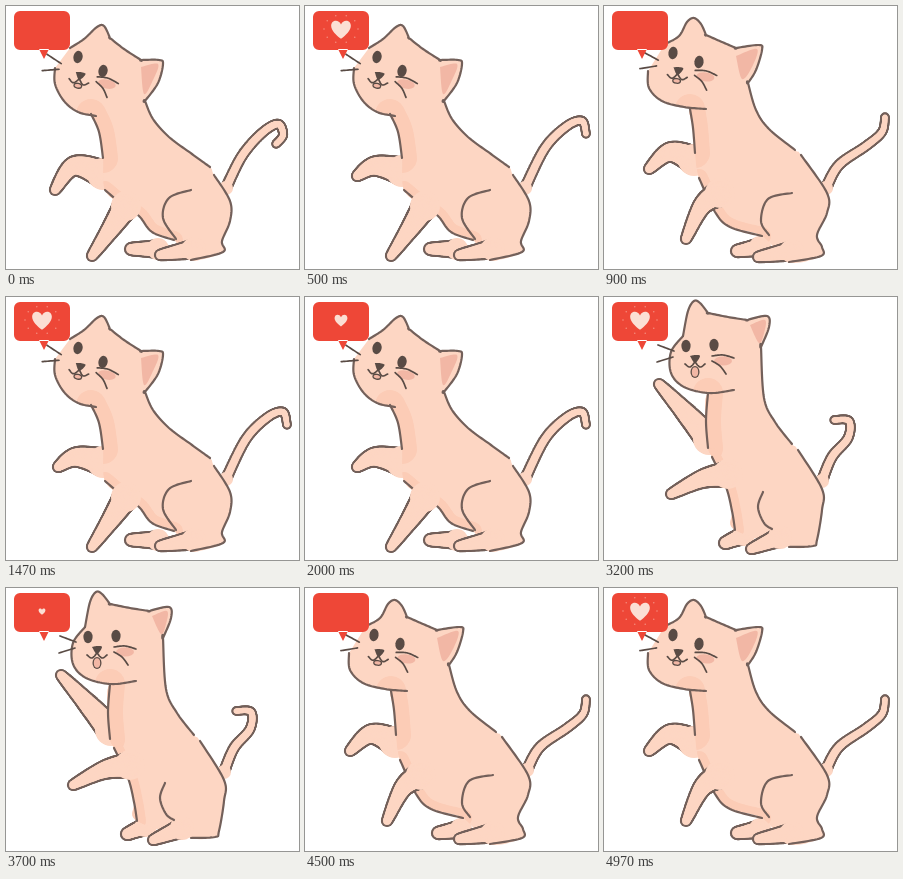
Animation of 293 by 263 pixels, one loop 5000 ms. Source, as an HTML page with a canvas:

```html
<!DOCTYPE html>
<html lang="en">
<head>
<meta charset="utf-8">
<title>Cat and heart</title>
<style>
html, body { margin: 0; width: 100%; height: 100%; overflow: hidden; background: #fff; }
canvas { display: block; width: 293px; height: 263px; }
</style>
</head>
<body>
<canvas id="stage" width="293" height="263"></canvas>
<script>
const ctx = document.getElementById('stage').getContext('2d');
const LOOP = 5000;
const FUR = '#fdd6c3', SHADE = '#fcccb6', PINK = '#f2b7a5', LINE = '#73605a', INK = '#594b45', RED = '#ee4737';

const parse = text => text.trim().split(/\s+/).map(pair => pair.split(',').map(Number));

// Points along a smooth curve through the key points; a repeated point makes a corner.
function spline(keys, steps = 12) {
  const out = [];
  for (let i = 0; i < keys.length - 1; i++) {
    const b = keys[i], c = keys[i + 1], a = keys[i - 1] || b, d = keys[i + 2] || c;
    for (let s = 0; s < steps; s++) {
      const u = s / steps;
      out.push([0, 1].map(k => b[k] + u / 2 * (c[k] - a[k]
        + u * (2 * a[k] - 5 * b[k] + 4 * c[k] - d[k] + u * (3 * (b[k] - c[k]) + d[k] - a[k])))));
    }
  }
  return [...out, keys[keys.length - 1]];
}

function pathOf(keys) {
  const path = new Path2D();
  for (const point of spline(keys)) path.lineTo(...point);
  return path;
}
const curve = text => pathOf(parse(text));

function fill(path, color) { ctx.fillStyle = color; ctx.fill(path); }
function stroke(path, width = 2.2, color = LINE) {
  ctx.lineWidth = width;
  ctx.strokeStyle = color;
  ctx.stroke(path);
}
function oval(x, y, rx, ry, angle, color) {
  ctx.fillStyle = color;
  ctx.beginPath();
  ctx.ellipse(x, y, rx, ry, angle, 0, Math.PI * 2);
  ctx.fill();
}

// A tapering limb along a spine, outlined except at its root.
function limb(spine, rootRadius, tipRadius) {
  const points = spline(spine, 30);
  const pass = (grow, color) => points.forEach(([x, y], i) => {
    const r = rootRadius + (tipRadius - rootRadius) * i / (points.length - 1) + grow;
    oval(x, y, r, r, 0, color);
  });
  pass(1.1, LINE);
  oval(...points[0], rootRadius + 2, rootRadius + 2, 0, FUR);
  pass(-1.1, FUR);
}

// The contour runs counter-clockwise: face, chest, belly, rump, then back and head.
function makePose(pose) {
  const parts = pose.contour.split('|').map(parse);
  const made = { ...pose, body: pathOf(parts.flat()), outline: parts.map(pathOf) };
  for (const key of ['paw', 'leg', 'tail', 'farFoot', 'nearFoot']) made[key] = parse(pose[key]);
  for (const key of ['thigh', 'ear']) made[key] = curve(pose[key]);
  return made;
}

const leaning = {
  contour: `49,62 49,78 58,95 72,106 90,110 | 85,108 93,126 97,152 | 99,184 118,200 133,210 146,226 168,234
    | 185,254 217,246 216,235 224,215 224,195 208,169
    | 204,161 186,148 163,131 147,113 139,95 139,95 152,77 157,58 153,54 135,54 135,54 118,43 104,32 104,32 98,20 91,21 78,33 64,42`,
  leg: '120,200 104,224 86,250', thigh: '185,184 163,192 157,212 170,233',
  farFoot: '152,243 125,243', nearFoot: '188,243 154,249',
  ear: '135,61 152,58 147,74 138,88 135,61',
  eyes: [[72, 51], [97, 65]], nose: [74, 70], tilt: .22
};

const curled = makePose({
  ...leaning, paw: '97,168 68,160 49,184', tail: '220,182 236,150 256,127 272,118 277,129 270,138'
});

const reaching = makePose({
  ...leaning, paw: '97,165 70,160 52,170', tail: '220,182 240,142 262,120 277,115 281,128'
});

const pawing = makePose({
  contour: `44,65 45,82 58,95 80,101 102,103 | 86,103 89,122 91,147 | 95,172 111,206 126,221 158,230
    | 185,256 217,250 218,241 213,229 223,207 223,187 197,149
    | 191,144 165,123 152,104 144,77 144,77 152,64 158,44 155,39 132,42 132,42 118,36 102,29 102,29 97,18 90,12 83,16 75,30 61,38`,
  paw: '90,154 66,146 45,163', tail: '222,182 235,159 262,140 278,126 281,111',
  leg: '116,187 98,200 82,233', thigh: '188,187 164,193 157,215 165,229',
  farFoot: '156,241 133,245', nearFoot: '188,245 154,251',
  ear: '132,50 153,43 148,61 138,73 132,50',
  eyes: [[69, 47], [95, 56]], nose: [74, 65], tilt: .14
});

const waving = makePose({
  contour: `79,39 67,55 67,76 80,90 105,96 130,93 | 104,96 102,124 104,151 | 108,160 122,190 128,214 131,233
    | 185,250 209,249 213,243 218,213 218,192 194,153
    | 188,147 171,125 160,101 157,50 157,50 165,30 163,19 143,23 143,23 124,20 104,16 104,16 96,6 90,4 84,14 79,39`,
  paw: '105,142 80,114 55,87', tail: '218,184 228,160 244,141 245,124 230,123',
  leg: '124,177 98,182 67,197', thigh: '159,195 154,210 160,226 168,232',
  farFoot: '140,238 121,246', nearFoot: '176,240 147,252',
  ear: '146,28 161,23 160,36 155,46 146,28',
  eyes: [[82, 49], [110, 48]], nose: [91, 62], tilt: 0, tongue: true
});

const poses = [waving, curled, pawing, reaching];

const snout = curve('-5,-3 0,-4 5,-3 0,4 -5,-3');
const lips = curve('-10,5 -5,8 0,3 0,3 5,8 10,5');
const whiskers = ['-21,-8 -37,-14', '-22,-2 -38,3', '17,2 25,7 31,15', '17,-3 28,-4 39,-1'].map(curve);

function drawFace({ eyes, nose, tilt, tongue }) {
  for (const [x, y] of eyes) oval(x, y, 4.6, 6.2, tilt, INK);
  ctx.save();
  ctx.translate(...nose);
  ctx.rotate(tilt);
  oval(28, 2, 9, 4.5, 0, PINK);
  whiskers.forEach(w => stroke(w, 1.7, INK));
  const length = tongue ? 6 : 3;
  oval(0, 7 + length, 4.5, length, 0, INK);
  oval(0, 7 + length, 3.2, length - 1.3, 0, PINK);
  fill(snout, INK);
  stroke(lips, 1.7, INK);
  ctx.restore();
}

function drawShade({ body, outline: [, chest, belly] }) {
  ctx.save();
  ctx.clip(body);
  stroke(chest, 30, SHADE);
  stroke(belly, 18, SHADE);
  ctx.restore();
}

function drawCat(pose) {
  limb(pose.tail, 5, 3.6);
  limb(pose.farFoot, 9, 6);
  limb(pose.paw, 14, 5);
  fill(pose.body, FUR);
  drawShade(pose);
  limb(pose.nearFoot, 10, 5);
  stroke(pose.thigh);
  pose.outline.forEach(line => stroke(line));
  limb(pose.leg, 13, 5);
  fill(pose.ear, PINK);
  drawFace(pose);
}

const heart = new Path2D('M0 .5 C-.25 .3 -.5 .05 -.5 -.2 C-.5 -.52 -.12 -.58 0 -.27 C.12 -.58 .5 -.52 .5 -.2 C.5 .05 .25 .3 0 .5Z');
const bubble = new Path2D();
bubble.roundRect(8, 5, 56, 39, 6);
bubble.moveTo(33, 43);
bubble.lineTo(38, 53);
bubble.lineTo(43, 43);

// The heart swells and shrinks, with a ring of sparks while it is large.
function drawBubble(phase) {
  fill(bubble, RED);
  const swell = Math.sin(Math.PI * phase);
  if (swell <= 0) return;
  if (swell > .9) {
    for (let a = 0; a < Math.PI * 2; a += Math.PI / 5) {
      oval(36 + 17 * Math.cos(a), 23 + 14 * Math.sin(a), .8, .8, 0, '#f58b7d');
    }
  }
  ctx.save();
  ctx.translate(36, 23.5);
  ctx.scale(20 * swell, 19 * swell);
  fill(heart, '#fbdfd4');
  ctx.restore();
}

function draw(now) {
  const t = now % LOOP;
  const tick = Math.floor(t * .03 + .01);
  const beat = Math.max(1, Math.floor((tick - .45) / 3.9));
  ctx.clearRect(0, 0, 293, 263);
  drawCat(poses[beat % poses.length]);
  drawBubble(Math.floor(t / 100) % 9 / 9);
}

ctx.lineCap = ctx.lineJoin = 'round';
const start = performance.now();
function loop() {
  draw(performance.now() - start);
  requestAnimationFrame(loop);
}
loop();
</script>
</body>
</html>
```
